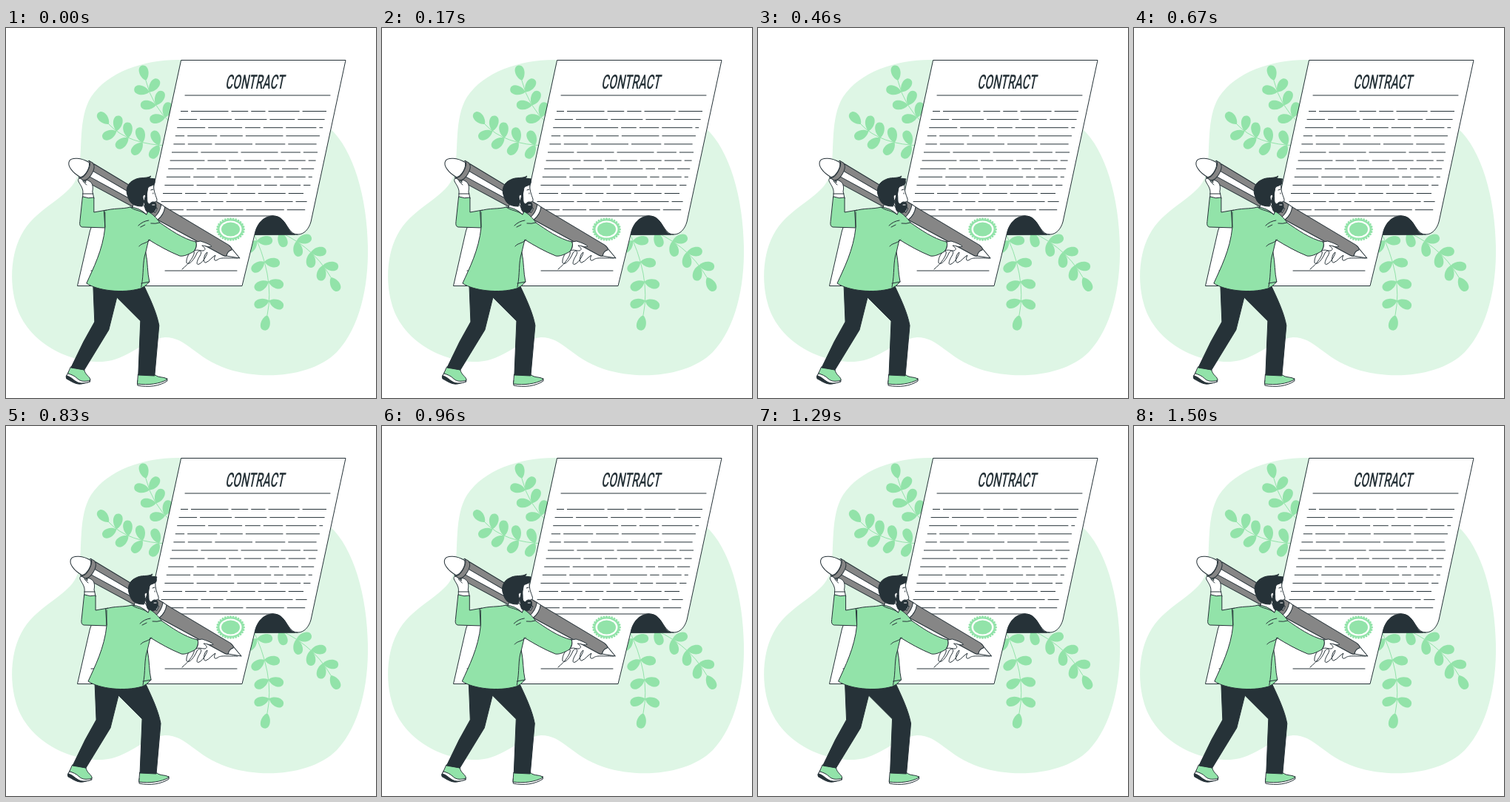
An HTML page that plays this animation: 500 by 500 pixels, repeating every 1.54 s.

```html
<!DOCTYPE html>
<html lang="en">
<head>
<meta charset="utf-8">
<title>Signing a contract</title>
<style>
  html, body { margin: 0; height: 100%; overflow: hidden; background: #fff; }
  svg { display: block; width: 100vw; height: 100vh; }
  .ink { fill: none; stroke: #263238; stroke-linejoin: round; stroke-linecap: round; }
  .white { fill: #fff; }
  .green { fill: #92e3a9; }
  .gray { fill: #868686; }
  .dark { fill: #263238; }
  .stem { fill: none; stroke: #92e3a9; }
  .title { font: 500 26.5px Roboto, sans-serif; }
</style>
</head>
<body>
<svg viewBox="0 0 500 500">
  <path fill="#def6e5" d="M236 43C190 42 138 58 115 93C97 122 104 165 98 195C92 224 58 234 32 263C8 290 3 335 13 372C25 418 75 452 130 451C165 449 185 421 215 418C245 418 255 446 300 461C350 477 415 470 447 438C478 405 490 350 489 295C488 230 470 165 438 136L300 43Z"/>
  <g id="plants"></g>

  <!-- sheet of paper -->
  <g class="ink">
    <path class="white" d="M237 43.5H459L412 262C409 272 403 279 394 279H186Z"/>
    <path class="dark" d="M336 279C338 264 348 254 361 254C379 254 379 276 390 279Z"/>
    <path d="M361 254C380 254 379 279 394 279"/>
    <path class="white" d="M361 254H140C127 254 117 262 113.500 274L96.500 348.500H319L336 279C339 264 348 254 361 254Z"/>
    <path d="M242 91H438M215 328H312M115 328H180"/>
    <path id="lines" stroke-linecap="butt"/>
    <path d="M238 326C248 318 256 306 254 302C250 299 243 310 244 317C246 322 254 314 258 304C262 298 266 302 262 308C257 316 257 321 261 319C267 316 272 306 272 303C268 304 265 318 270 317C275 315 279 309 283 307C280 313 282 316 286 313C290 310 296 311 313 311"/>
  </g>
  <text class="title dark" transform="matrix(.58 0 -.2 1 296 82)">CONTRACT</text>

  <!-- seal -->
  <g transform="translate(303.500 272)">
    <ellipse class="green" rx="17.500" ry="13.800"/>
    <ellipse class="stem" rx="18" ry="14.300" stroke-width="3" stroke-linecap="round" pathLength="28" stroke-dasharray="0 1"/>
    <ellipse class="white" rx="15" ry="11.500"/>
    <ellipse class="green" rx="12.500" ry="9.500"/>
  </g>

  <g id="signer" class="ink">
    <!-- pen, tip at the local origin -->
    <g transform="translate(316 311) rotate(29.700)">
      <path class="white" d="M-20-7.500L0 0L-20 7.500Z"/>
      <path class="gray" d="M-122-10L-22-8Q-15-7-15-4Q-19 0-17 6Q-18 8-22 8L-122 10Z"/>
      <path class="white" d="M-128-10.500L-122-10Q-118 0-122 10L-128 10.500Z"/>
      <path class="gray" d="M-234-13L-128-10.500Q-124 0-128 10.500L-234 13Z"/>
      <path class="white" d="M-232-4L-130-3V3L-232 5Z"/>
      <path class="gray" d="M-242-13.500H-236C-228-10-228 10-236 13.500H-242Z"/>
      <path class="white" d="M-242-13.500C-235-10-235 10-242 13.500C-246 10-246-10-242-13.500Z"/>
      <path class="white" d="M-241-11.500C-253-12-265-6-265 0C-265 7-253 12-241 11.500C-236 7-236-7-241-11.500Z"/>
    </g>

    <!-- shoes and legs -->
    <path class="dark" d="M83 468Q80 471 82 474C88 477 94 482 102 481L114 478L113 475Z"/>
    <path class="white" d="M84 466L82 470C89 471 94 480 102 480C108 480 114 479 114 476Z"/>
    <path class="green" d="M88 458L106 462C107 469 115 472 114 476C108 478 101 478 97 474C93 470 88 468 84 467Z"/>
    <path class="white" d="M178 477V483C192 486 208 484 218 477V474Z"/>
    <path class="green" d="M179 468L202 469C206 473 216 471 218 475C208 481 192 483 178 481Z"/>
    <path class="dark" d="M118 347L120 397L105 424L88 459L106 462L139 408L150 364L182 396L179 469L201 470L207 402C204 385 195 366 186 347Z"/>

    <!-- raised arm -->
    <path class="white" d="M104 230V224C105 217 101 213 98 207C97 203 100 202 103 205L108 209C107 205 110 205 113 207C118 210 118 216 117 221L119 230Z"/>
    <path d="M104 207L109 212M104 224H118"/>
    <path class="green" d="M104 228Q112 231 119 229L119 249L136 246V270L103 269Q99 268 100 262Z"/>

    <!-- neck and head -->
    <path class="white" d="M174 235L192 238L191 252L170 246Z"/>
    <path class="white" d="M185 212L200 210C199 219 202 225 204 231Q205 235 201 235L202 244L190 246L184 236Z"/>
    <path class="dark" d="M190 222C192 230 189 236 194 238C198 233 202 235 203 238C204 245 201 249 196 250C190 250 188 246 188 241L187 234Z"/>
    <path class="dark" d="M184 241C172 241 167 236 165 228C161 219 164 209 174 205C181 201 190 204 196 200L194 203L202 204C200 206 203 210 199 212C196 214 194 213 192 216L190 227C186 223 183 228 187 234Z"/>
    <path d="M196 219L199 218M199 223V224"/>
    <path stroke="#fff" d="M198 239L201 239"/>

    <!-- shirt -->
    <path class="green" d="M133 247C145 243 158 245 168 242Q181 243 190 252L192 248C198 251 204 257 208 263C221 272 239 285 257 289Q259 295 254 302C247 306 240 309 235 308C220 302 206 294 193 286L189 303C192 317 191 330 194 343Q188 350 182 352C158 359 124 355 109 345C118 325 131 300 134 270Z"/>
    <path d="M168 242C174 247 182 246 190 252M134 249V269M189 303C184 317 187 331 183 350M180 295C184 290 189 292 195 286M179 267Q185 261 193 260M182 269L188 266M196 264Q202 265 208 263M194 343L183 345"/>

    <!-- signing hand -->
    <path class="white" d="M257 289L263 288C269 290 275 292 278 295C274 297 270 294 265 294C269 297 271 299 267 301C262 301 259 299 255 301Q259 295 257 289Z"/>
  </g>
</svg>
<script>
const $ = id => document.getElementById(id);

function leaf(x, y, degrees) {
  const place = `translate(${x} ${y}) rotate(${degrees}) scale(21)`;
  return `<path class="green" d="M0 0C.3-.4 1-.4 1 0S.3 .4 0 0" transform="${place}"/>`;
}

// A curved stem with evenly spaced pairs of leaves and one leaf at the tip.
function branch([x0, y0], [x1, y1], [x2, y2], pairs, spread) {
  const mix = (a, b, c, t) => (1 - t) ** 2 * a + 2 * t * (1 - t) * b + t * t * c;
  const slope = (a, b, c, t) => (1 - t) * (b - a) + t * (c - b);
  const leafAt = (t, turn) => {
    const heading = Math.atan2(slope(y0, y1, y2, t), slope(x0, x1, x2, t)) * 180 / Math.PI;
    return leaf(mix(x0, x1, x2, t), mix(y0, y1, y2, t), heading + turn);
  };
  let shapes = `<path class="stem" d="M${x0} ${y0}Q${x1} ${y1} ${x2} ${y2}"/>` + leafAt(1, 0);
  for (let i = 0; i < pairs; i++) {
    const t = (i + .6) / (pairs + .4);
    shapes += leafAt(t, -spread) + leafAt(t, spread);
  }
  return shapes;
}
$('plants').innerHTML =
  branch([224, 130], [197, 105], [189, 71], 3, 56) +
  branch([222, 159], [165, 158], [139, 130], 4, 62) +
  branch([331, 270], [364, 335], [353, 388], 4, 68) +
  branch([355, 270], [412, 290], [439, 337], 4, 47);

// Text rows: words of random length along the slant of the sheet.
let seed = 7;
const random = () => (seed = seed * 16807 % 2147483647) / 2147483647;
let words = '';
for (let row = 0; row < 13; row++) {
  const y = 112.5 + 11.1 * row, end = 433 - 2.4 * row;
  for (let x = 236 - 2.4 * row; x < end - 4;) {
    const stop = Math.min(x + 10 + 44 * random(), end);
    words += `M${x} ${y}H${stop}`;
    x = stop + 4;
  }
}
$('lines').setAttribute('d', words);

// Linear sideways shake with a key every tenth of 1500 ms, shown at 24 steps per second.
const keys = [0, -1, 2, -4, 4, -4, 4, -4, 2, -1, 0];
function draw(now) {
  const step = Math.floor(((now % 1540) + 5) / 41.62) % 37;
  const p = ((step * 1500 / 36 + 30) % 1500) / 150, i = Math.floor(p);
  const dx = keys[i] + (keys[i + 1] - keys[i]) * (p - i);
  $('signer').setAttribute('transform', `translate(${dx} 0)`);
}
const start = performance.now();
(function tick() {
  draw(performance.now() - start);
  requestAnimationFrame(tick);
})();
</script>
</body>
</html>
```
